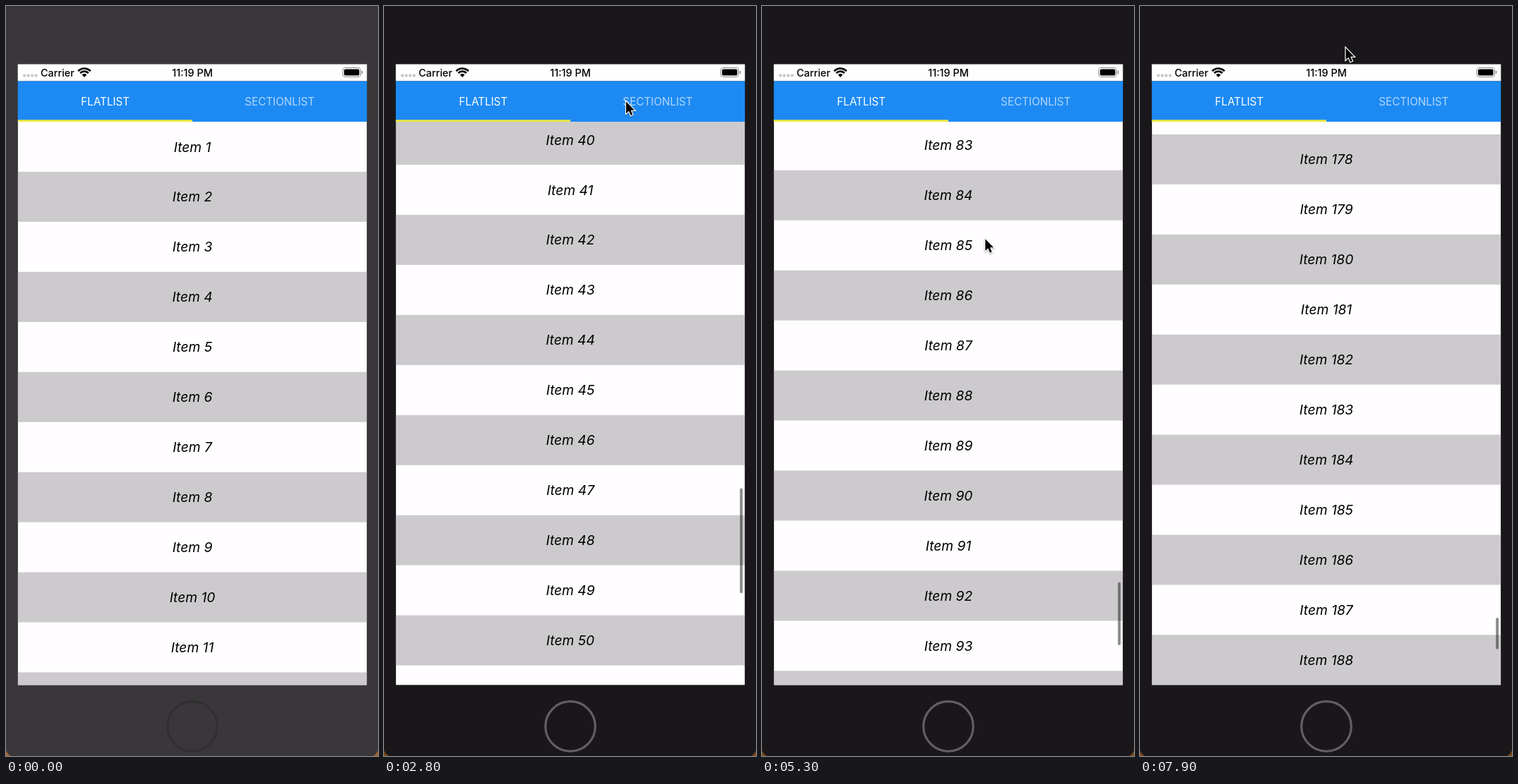
These frames come from a looping animation (527x1063 px, 8000 ms). An HTML page with a canvas:

```html
<!DOCTYPE html>
<html lang="en">
<head>
<meta charset="utf-8">
<title>List scrolling</title>
<style>
  html, body { margin: 0; width: 100%; height: 100%; overflow: hidden; background: #19171a; }
  canvas { display: block; }
</style>
</head>
<body>
<canvas id="stage" width="527" height="1063"></canvas>
<script>
const ctx = document.getElementById('stage').getContext('2d');
const LOOP = 8000, STEP = 100, CLICK = 700;
const LEFT = 16.7, RIGHT = 511.3, MID = 264, LIST_TOP = 164, BOTTOM = 962.6;
const ROW = 70.95, VIEW = BOTTOM - LIST_TOP;
const FONT = 'Inter, "Noto Sans", sans-serif';

// Pointer path: time, x, y
const pointer = [
  [100, 434, 1030], [400, 365, 850], [750, 365, 850], [1000, 344, 367],
  [1450, 344, 367], [1950, 345, 734], [2050, 345, 734], [2300, 342, 134],
  [2850, 342, 134], [3500, 345, 778], [3600, 345, 778], [3850, 326, 98],
  [4200, 326, 98], [4700, 325, 216], [5150, 318, 508], [5250, 318, 508],
  [5400, 310, -30], [6100, 310, -30], [6900, 267, 740], [7150, 267, 740],
  [7400, 283, 150], [7800, 285, 150], [7900, 290.5, 58], [8000, 290.5, 58]
];

// Drags: press time, release time, distance still to coast
const flicks = [
  [750, 1000, 968], [2050, 2300, 1336], [3600, 3850, 1907.5],
  [5250, 5400, 4163.6], [7150, 7400, 2742.6]
];

function pointerAt(t) {
  const i = pointer.findIndex(p => p[0] >= t);
  if (i < 1) return pointer[0].slice(1);
  const [t0, x0, y0] = pointer[i - 1], [t1, x1, y1] = pointer[i];
  const k = (t - t0) / (t1 - t0);
  return [x0 + (x1 - x0) * k, y0 + (y1 - y0) * k];
}

function scrollAt(t) {
  let offset = 0;
  flicks.forEach(([press, release, coast], i) => {
    if (t <= press) return;
    offset += pointerAt(press)[1] - pointerAt(Math.min(t, release))[1];
    const end = Math.min(t, i + 1 < flicks.length ? flicks[i + 1][0] : LOOP);
    if (end > release) offset += coast * (1 - Math.exp((release - end) / 500));
  });
  return offset;
}

function rect(x, y, w, h, color) {
  ctx.fillStyle = color;
  ctx.fillRect(x, y, w, h);
}

function pill(x, y, w, h, r, color, outline) {
  ctx.beginPath();
  ctx.roundRect(x, y, w, h, r);
  ctx[outline ? 'strokeStyle' : 'fillStyle'] = color;
  if (outline) { ctx.lineWidth = outline; ctx.stroke(); } else ctx.fill();
}

function text(str, x, y, font, color, align = 'center') {
  ctx.font = `${font} ${FONT}`;
  ctx.textAlign = align;
  ctx.fillStyle = color;
  ctx.fillText(str, x, y);
}

function polygon(points) {
  ctx.beginPath();
  points.forEach(([x, y]) => ctx.lineTo(x, y));
  ctx.closePath();
}

function drawBody(active) {
  rect(0, 0, 527, 1063, active ? '#19171a' : '#393739');
  ctx.fillStyle = active ? '#754620' : '#a5622a';
  for (const [x, dir] of [[0, 1], [527, -1]]) {
    ctx.beginPath();
    ctx.moveTo(x, 1055);
    ctx.quadraticCurveTo(x + 2 * dir, 1060, x + 7 * dir, 1063);
    ctx.lineTo(x, 1063);
    ctx.fill();
  }
  ctx.beginPath();
  ctx.arc(MID, 1021, 35.3, 0, 7);
  ctx.lineWidth = 3.2;
  ctx.strokeStyle = active ? '#625f63' : '#312f31';
  ctx.stroke();
}

function drawList(t) {
  const offset = scrollAt(t);
  ctx.save();
  ctx.beginPath();
  ctx.rect(LEFT, LIST_TOP, RIGHT - LEFT, VIEW);
  ctx.clip();
  rect(LEFT, LIST_TOP, RIGHT - LEFT, VIEW, '#fffdff');
  const first = Math.floor(offset / ROW);
  for (let i = first; i < first + 13; i++) {
    const y = LIST_TOP + i * ROW - offset;
    if (i % 2) rect(LEFT, y, RIGHT - LEFT, ROW, '#cccacd');
    text(`Item ${i + 1}`, MID, y + 42.5, 'italic 400 19.2px', '#000');
  }
  ctx.restore();
  if (t > CLICK) drawScrollBar(t, offset);
}

function drawScrollBar(t, offset) {
  // Rows are loaded in batches of ten
  const ahead = t > 7700 ? 3 : 0.4;
  const rows = Math.max(30, Math.ceil(((offset + VIEW) / ROW + ahead) / 10) * 10);
  const content = rows * ROW, track = VIEW - 6;
  const length = track * VIEW / content;
  const y = LIST_TOP + 2.5 + offset / (content - VIEW) * (track - length);
  const alpha = 0.45 * Math.min(1, (t - CLICK) / 200);
  pill(504.2, y, 3.8, length, 1.9, `rgba(0,0,0,${alpha})`);
}

function drawHeader() {
  rect(LEFT, 82.5, RIGHT - LEFT, 24, '#fffdff');
  for (let i = 0; i < 4; i++) pill(24 + i * 5.5, 96.5, 4.2, 4.2, 2.1, '#c6c4c7');
  text('Carrier', 49, 99.5, '500 14.4px', '#000', 'left');
  text('11:19 PM', MID, 99.5, '500 14.4px', '#000');

  ctx.strokeStyle = ctx.fillStyle = '#000';
  ctx.lineWidth = 2.7;
  for (const r of [12, 7.8]) {
    ctx.beginPath();
    ctx.arc(111, 100.5, r, -Math.PI * 0.76, -Math.PI * 0.24);
    ctx.stroke();
  }
  ctx.beginPath();
  ctx.moveTo(111, 101);
  ctx.arc(111, 100.5, 4.5, -Math.PI * 0.76, -Math.PI * 0.24);
  ctx.fill();

  pill(477, 87.5, 25.4, 13, 3.8, '#8f8d90', 1.1);
  pill(478.9, 89.4, 21.6, 9.2, 2.2, '#000');
  pill(503.8, 91.8, 1.6, 4.4, 0.8, '#8f8d90');

  rect(LEFT, 106.5, RIGHT - LEFT, 57.5, '#1d8af3');
  text('FLATLIST', 140.7, 141, '400 15.2px', '#fff');
  text('SECTIONLIST', 387.8, 141, '400 15.2px', 'rgba(255,255,255,.66)');
  rect(LEFT, 161.3, MID - LEFT, 2.7, '#f0e83c');
}

function drawPointer(t) {
  if (t < pointer[0][0]) return;
  const [x, y] = pointerAt(t);
  ctx.save();
  ctx.translate(x + 1, y + 1.5);
  polygon([[0, 0], [0, 16.8], [3.9, 13.2], [6.6, 19.6], [9.3, 18.4], [6.6, 12.2], [11.8, 12.2]]);
  ctx.shadowColor = 'rgba(0,0,0,.35)';
  ctx.shadowBlur = 2;
  ctx.shadowOffsetY = 1;
  ctx.lineWidth = 2.4;
  ctx.strokeStyle = '#fff';
  ctx.stroke();
  ctx.shadowColor = 'transparent';
  ctx.fillStyle = '#000';
  ctx.fill();
  ctx.restore();
}

function frame() {
  const t = Math.floor(performance.now() % LOOP / STEP) * STEP;
  drawBody(t >= CLICK);
  drawList(t);
  drawHeader();
  drawPointer(t);
  requestAnimationFrame(frame);
}
frame();
</script>
</body>
</html>
```
